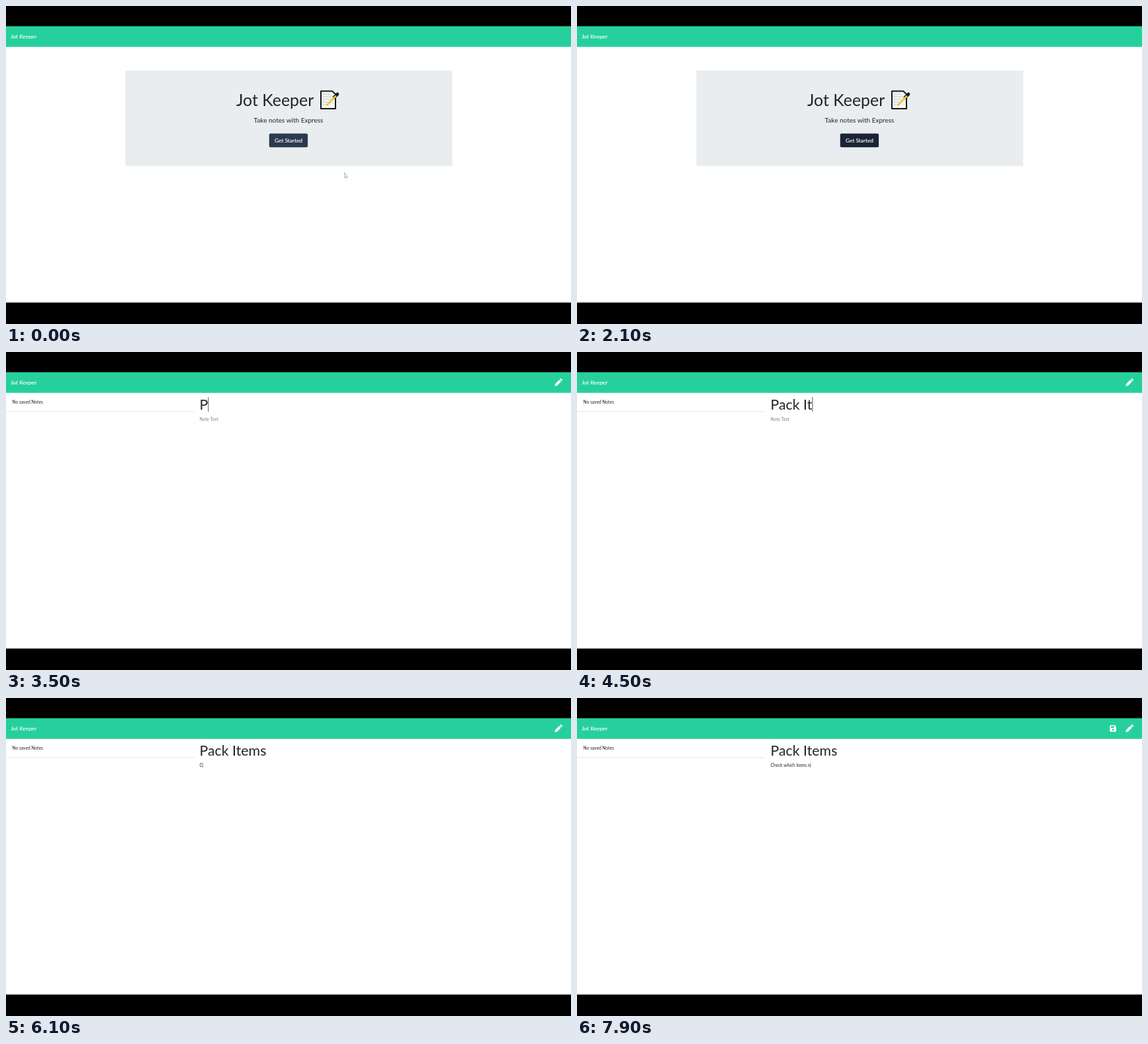
An HTML page for the animation above (8 s loop, 854 px wide and 480 px high).

```html
<!DOCTYPE html>
<html lang="en">
<head>
<meta charset="utf-8">
<title>Jot Keeper</title>
<style>
  html, body { margin: 0; width: 100%; height: 100%; overflow: hidden; background: #000; }
  svg { display: block; width: 100%; height: 100%; font-family: Lato, sans-serif; fill: #212529; }
  text { white-space: pre; }
  .small { font-size: 6.67px; }
  .medium { font-size: 8.34px; fill: #fff; stroke: #fff; stroke-width: .15; }
  .large { font-size: 21.35px; }
  .hint { fill: #858585; }
</style>
</head>
<body>
<svg viewBox="0 0 854 480">
  <rect y="61" width="854" height="386.600" fill="#fff"/>
  <rect y="30.500" width="854" height="31.200" fill="#26d09c"/>
  <text class="medium" x="7" y="49">Jot Keeper</text>

  <g id="home">
    <rect x="180.500" y="97.500" width="494" height="144" fill="#e9edf0"/>
    <text x="348" y="150.500" font-size="24.900">Jot Keeper</text>
    <g stroke="#161616" stroke-width="2" stroke-linejoin="round" stroke-linecap="round">
      <path d="M476 128.500H493L498 133V155H476Z" fill="#f4f4f4"/>
      <path d="M479 133H489M479 137H492M479 141H490M479 145H486M479 149H484" stroke="#c8c8c8" stroke-width="1"/>
      <path d="M496 138L501 133" stroke-width="4.600"/>
      <path d="M487 147.500L498 136.500" stroke="#f2c63c" stroke-width="3"/>
      <path d="M484 150.500L485.500 147.500L487.500 149.500Z" fill="#d9a441" stroke="none"/>
    </g>
    <text x="427" y="176" font-size="10" text-anchor="middle">Take notes with Express</text>
    <rect id="button" x="397.800" y="192.600" width="58.300" height="20.700" rx="2"/>
    <text class="medium" x="427" y="206" text-anchor="middle">Get Started</text>
    <path id="pointer" d="M0 0V8L1.800 6.300L3 9L4 8.500L2.900 6H5Z" fill="#f4f4f4" stroke="#9a9da0" stroke-width=".7"/>
  </g>

  <g id="editor">
    <text class="small" x="9.500" y="78.300">No saved Notes</text>
    <path d="M0 90H285" stroke="#dcdcdc" stroke-width=".7"/>
    <text class="large" id="title" x="292.500" y="86.600"></text>
    <text class="small" id="note" x="292.500" y="104"></text>
    <rect id="caret" fill="#555"/>
    <g id="save">
      <path d="M806.500 41H812.500L815 43.500V50Q815 51 814 51H806.500Q805.500 51 805.500 50V42Q805.500 41 806.500 41Z" fill="#fff"/>
      <path d="M807 42.500H812V45H807Z" fill="#26d09c"/>
      <circle cx="810.200" cy="48" r="1.500" fill="#26d09c"/>
    </g>
    <path id="pencil" d="M829.500 51.500L830 48.200L836.200 42L839 44.800L832.800 51ZM836.900 41.300L838 40.200Q838.700 39.700 839.400 40.300L840.700 41.600Q841.200 42.300 840.700 43L839.700 44.100Z" fill="#fff"/>
  </g>
</svg>
<script>
const LOOP = 8000;
const $ = id => document.getElementById(id);
const show = (id, on) => $(id).style.display = on ? '' : 'none';

// Pointer path: time, x, y
const path = [[0, 511.5, 251.5], [100, 511.5, 251.5], [600, 482, 245], [800, 482, 245], [1100, 426, 229], [1300, 426, 213]];
const titleKeys = [3500, 3700, 3800, 3900, 4100, 4300, 4500, 4700, 5300, 5400];

function pointerAt(t) {
  const i = path.findIndex(p => p[0] > t);
  if (i < 0) return path[path.length - 1].slice(1);
  const [t0, x0, y0] = path[i - 1], [t1, x1, y1] = path[i];
  const k = (t - t0) / (t1 - t0);
  return [x0 + (x1 - x0) * k, y0 + (y1 - y0) * k];
}

// Fills a field and returns the x of its text end.
function field(id, typed, hint) {
  const el = $(id), value = typed || hint;
  if (el.textContent !== value) el.textContent = value;
  el.classList.toggle('hint', !typed);
  return 292.5 + (typed ? el.getComputedTextLength() : 0);
}

function placeCaret(x, y, width, height) {
  Object.entries({ x, y, width, height }).forEach(([k, v]) => $('caret').setAttribute(k, v));
}

function draw(t) {
  const home = t < 2200, hover = t >= 1300;
  show('home', home);
  show('editor', !home);
  if (home) {
    $('button').setAttribute('fill', hover ? '#1a2434' : '#2b3a4e');
    $('pointer').setAttribute('transform', `translate(${pointerAt(t)})`);
    show('pointer', !hover);
    return;
  }
  const title = 'Pack Items'.slice(0, titleKeys.filter(k => k <= t).length);
  const count = Math.max(0, Math.floor((t - 6100) / 100) + 1);
  const titleEnd = field('title', title, 'Note Title');
  const noteEnd = field('note', 'Check which items n'.slice(0, count), 'Note Text');
  if (t < 5600) placeCaret(titleEnd, 68, 1, 22);
  else placeCaret(noteEnd, 98, .6, 7);
  show('caret', t >= 3000);
  show('pencil', t >= 2300);
  show('save', t >= 6200);
}

function frame(now) {
  draw(now % LOOP);
  requestAnimationFrame(frame);
}
requestAnimationFrame(frame);
</script>
</body>
</html>
```
